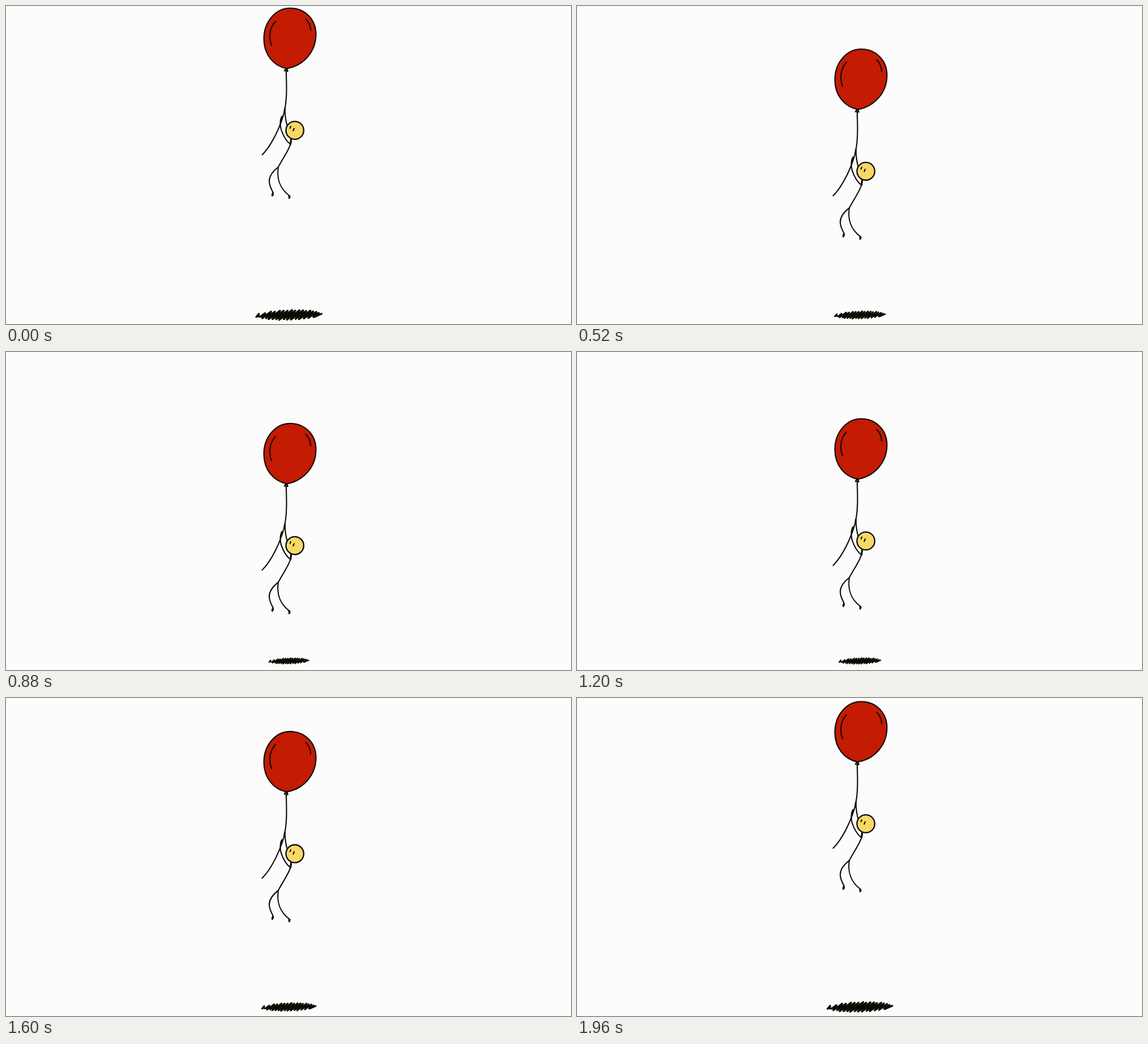
Write an HTML page that moves like this. It is 998 by 561 pixels and loops after 2 s.

```html
<!DOCTYPE html>
<html lang="en">
<head>
<meta charset="utf-8">
<title>Balloon ride</title>
<style>
  html, body { margin: 0; width: 100%; height: 100%; overflow: hidden; background: #fcfcfc; }
  svg { display: block; width: 100vw; height: 100vh; }
  .ink { fill: none; stroke: #0d0a02; stroke-width: 2.1; stroke-linecap: round; stroke-linejoin: round; }
  .solid { fill: #0d0a02; }
</style>
</head>
<body>
<svg viewBox="0 0 998 561">
  <g id="shadow" class="ink"><path id="scribble" stroke-width="3.5"/></g>
  <g id="rider" class="ink">
    <!-- string -->
    <path d="M494.8 114C496 145 496.2 167 491.5 187C486 209 471 244 452.5 262.5"/>
    <!-- arms -->
    <path d="M492.5 182C493 195 494 203 497 212"/>
    <path d="M492.5 182L491.8 188" stroke-width="3"/>
    <path d="M488 194.5C483.5 199 484 212 486 218C490 230 496 239 502.5 244"/>
    <path d="M487.6 195L485.8 201" stroke-width="2.8"/>
    <!-- body and legs -->
    <path d="M503.8 235L502.5 244" stroke-width="3.2"/>
    <path d="M502.5 243C500.5 253 490 267 481 284"/>
    <path d="M481 284C472 291 465 299 465 309C465 317 468.5 323 472 329.5"/>
    <path d="M481 284C478 303 483 322 501 335"/>
    <path class="solid" stroke-width="1.4" d="M471 329.5Q473.5 331 471.8 334L470.2 335.6Q468.6 333 471 329.5Z"/>
    <path class="solid" stroke-width="1.4" d="M499.2 334.8L502 335.4L501.2 339.2L499.6 339.6Z"/>
    <!-- head -->
    <circle cx="510.2" cy="219.4" r="15.7" fill="#f8d867" stroke-width="2.3"/>
    <path d="M503 212.5L501.7 215.6M508.9 216L507.3 220"/>
    <!-- balloon -->
    <path fill="#c41b03" d="M496 110.3C473 106 455.5 86 455.5 58C455.5 28 476 3.8 502 3.8C528 3.8 547.5 23.5 547.5 50C547.5 81 525 105.5 496 110.3Z"/>
    <path d="M476 27C465.5 38 463.5 55 469 69.5M529.5 23C535 28 537.6 35 538.2 43"/>
    <path stroke-width="1" opacity=".6" d="M480.5 22.2v.1M537.3 47.2v.1"/>
    <path class="solid" stroke-width="1.2" d="M493.4 110.5L491.3 114.8L494 114.2L495.6 115.8L498.3 115L496.8 110.5Z"/>
    <path stroke="#fcfcfc" stroke-width="1" d="M494.8 112.8v.3"/>
  </g>
</svg>
<script>
  const LOOP = 2000, STEP = 40;
  const LOWEST = 1016, RISE_END = 1977, DROP = 141;
  const SHADOW = { x: 499.7, y: 545 };
  const rider = document.getElementById('rider');
  const shadow = document.getElementById('shadow');

  // Slanted zigzag inside a lens-shaped envelope, centred on the origin.
  function scribblePath(strokes) {
    const points = ['-57.5,3.5', '-53,-2', '-54,2.5'];
    for (let i = 0; i < strokes; i++) {
      const u = i / (strokes - 1);
      const half = 3 + 5 * Math.sqrt(Math.sin(Math.PI * u)) + 0.6 * Math.sin(i * 2.4);
      const x = -46 + 94 * u;
      const lean = half * 1.35;
      points.push(`${x - lean},${half}`, `${x + lean},${-half}`);
    }
    points.push('45,3.5', '57.5,-2');
    return 'M' + points.join('L');
  }

  function dropAt(t) {
    return t < LOWEST
      ? DROP * t / LOWEST
      : Math.max(0, DROP * (RISE_END - t) / (RISE_END - LOWEST));
  }

  function draw(t) {
    const drop = dropAt(t);
    const scale = 1 - 0.0032 * drop;
    rider.setAttribute('transform', `translate(0 ${drop})`);
    shadow.setAttribute('transform', `translate(${SHADOW.x} ${SHADOW.y}) scale(${scale})`);
  }

  document.getElementById('scribble').setAttribute('d', scribblePath(15));

  const start = performance.now();
  function tick() {
    const t = (performance.now() - start) % LOOP;
    draw(Math.floor(t / STEP) * STEP);
    requestAnimationFrame(tick);
  }
  draw(0);
  requestAnimationFrame(tick);
</script>
</body>
</html>
```
